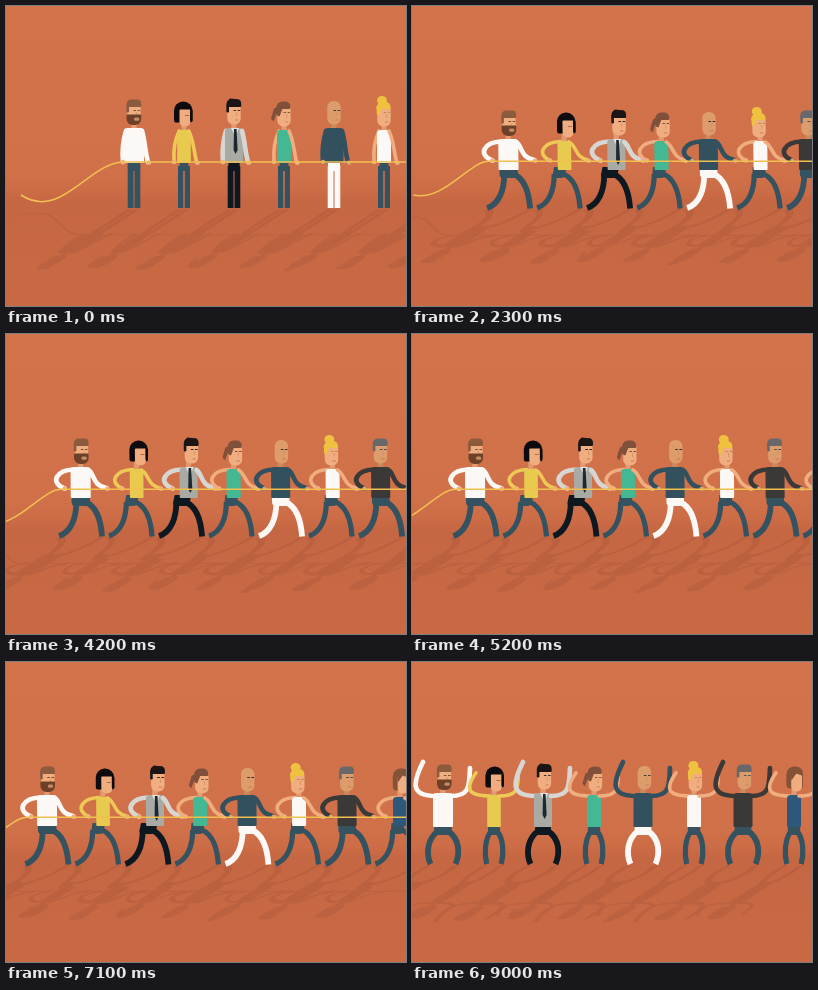
An HTML page with a canvas for the animation above (9100 ms loop, 400 px wide and 300 px high).

```html
<!DOCTYPE html>
<html lang="en">
<head>
<meta charset="utf-8">
<title>Tug of war</title>
<style>
html, body { margin: 0; width: 100%; height: 100%; overflow: hidden; background: #d3734b; }
canvas { display: block; width: 400px; height: 300px; }
</style>
</head>
<body>
<canvas id="stage"></canvas>
<script>
const W = 400, H = 300, LOOP = 9100, STEP = 100, GROUND = 203;
const SKIN = '#f0ae80', TAN = '#dc9c6c', SLATE = '#34525f', WHITE = '#fbf8f5', DARK = '#3b3937';

const ratio = window.devicePixelRatio || 1;
function surface(canvas) {
  canvas.width = W * ratio;
  canvas.height = H * ratio;
  const c = canvas.getContext('2d');
  c.scale(ratio, ratio);
  return c;
}
const view = surface(document.getElementById('stage'));
const shade = surface(document.createElement('canvas'));

let g = view, solid = null;
const ink = color => solid || color;

// Limbs are cubic curves: four x,y pairs measured from the figure's middle.
const STAND = {
  top: 122, bot: 157, hip: 0.63,
  la: [-8, 125, -11, 135, -12, 145, -11, 156],
  ra: [8, 125, 11, 135, 11, 146, 14, 156],
  ll: [-3.4, 160, -3.4, 174, -3.4, 188, -3.4, 202],
  rl: [3.4, 160, 3.4, 174, 3.4, 188, 3.4, 202]
};
const TUG = {
  top: 133, bot: 164, hip: 0.92,
  la: [-7, 135.5, -23, 136, -32, 148, -16, 154.5],
  ra: [8, 136, 14, 140, 12, 152, 26, 154],
  ll: [-4.5, 168, -4.5, 184, -10, 198, -22, 202],
  rl: [5, 168, 16, 173, 20, 186, 21, 202.5]
};
const CHEER = {
  top: 131, bot: 165, hip: 0.88,
  la: [-7, 134, -32, 134, -31, 122, -20, 100],
  ra: [8, 134, 28, 134, 26, 122, 27, 106],
  ll: [-5, 169, -16, 177, -17, 192, -12.5, 202],
  rl: [5, 169, 17, 177, 17, 192, 12.5, 202]
};

// dx: body shift while pulling, hx: extra head shift
const TEAM = [
  { hair: beard, top: WHITE, arm: WHITE, leg: SLATE, half: 10, dx: 0, hx: 1 },
  { hair: bob, top: '#e8cb4e', arm: '#eec955', leg: SLATE, half: 6.8, dx: 6, hx: 3, fem: 1 },
  { hair: quiff, top: '#a9aaa4', arm: '#d8d6d2', leg: '#0e1820', half: 9, dx: 8, hx: 3, tie: 1 },
  { hair: pony, top: '#43b892', arm: SKIN, leg: SLATE, half: 7, dx: 3, hx: 2, fem: 1 },
  { hair: bald, top: '#33505f', arm: '#33505f', leg: WHITE, half: 9.5, dx: 0, hx: 1, skin: TAN },
  { hair: bun, top: WHITE, arm: SKIN, leg: SLATE, half: 7, dx: 2, hx: -1, fem: 1 },
  { hair: grey, top: DARK, arm: DARK, leg: SLATE, half: 9.5, dx: 0, hx: 0, skin: TAN },
  { hair: long, top: '#2d587a', arm: SKIN, leg: SLATE, half: 7, dx: 3, hx: 2, fem: 1 }
];

const mix = (a, b, k) => a + (b - a) * k;
const ease = (t, from, to) => {
  const k = Math.min(1, Math.max(0, (t - from) / (to - from)));
  return k * k * (3 - 2 * k);
};

function blend(a, b, k) {
  const out = {};
  for (const key in a) {
    out[key] = Array.isArray(a[key]) ? a[key].map((v, i) => mix(v, b[key][i], k)) : mix(a[key], b[key], k);
  }
  return out;
}

function box(x, y, w, h, r, color) {
  g.fillStyle = ink(color);
  g.beginPath();
  g.roundRect(x, y, w, h, r);
  g.fill();
}

function dot(x, y, rx, ry, color) {
  g.fillStyle = ink(color);
  g.beginPath();
  g.ellipse(x, y, rx, ry, 0, 0, 7);
  g.fill();
}

function poly(color, ...p) {
  g.fillStyle = ink(color);
  g.beginPath();
  for (let i = 0; i < p.length; i += 2) g.lineTo(p[i], p[i + 1]);
  g.closePath();
  g.fill();
}

function limb(p, width, color) {
  g.strokeStyle = ink(color);
  g.lineWidth = width;
  g.beginPath();
  g.moveTo(p[0], p[1]);
  g.bezierCurveTo(p[2], p[3], p[4], p[5], p[6], p[7]);
  g.stroke();
}

// Heads: origin at the chin
function face(skin, brow) {
  box(-6.7, -23.5, 13.4, 23.5, 6, skin);
  box(-0.5, -14.5, 2.6, 0.9, 0, brow);
  box(3.6, -14.5, 2.6, 0.9, 0, brow);
  box(2.4, -12.5, 0.8, 4, 0, '#d18f64');
  box(1, -5, 3.4, 0.9, 0, '#c9795a');
}
function cap(color) {
  box(-7.6, -25, 14.8, 7.5, [5, 4, 1, 1], color);
  box(-7.6, -19, 2.6, 7, 1, color);
}
function beard(skin) {
  face(skin, '#7a4a33');
  cap('#8c5b3d');
  box(-7.4, -10, 14.6, 10.5, [1, 1, 6, 6], '#6d4028');
  box(0, -7, 5.4, 3.2, 1.5, '#c58a66');
}
function bob(skin) {
  box(-10, -25, 18.5, 21, [9, 9, 2, 2], '#0d0b0d');
  box(-4.5, -17, 11, 17, [1, 1, 5, 5], skin);
  box(6, -17, 2.5, 12, 1, '#0d0b0d');
  box(1, -11.5, 4, 0.8, 0, '#8d5a40');
}
function quiff(skin) {
  face(skin, '#2a2020');
  cap('#1b1516');
  poly('#1b1516', -7, -23, -4, -26, 5, -25, 7.2, -19, 1, -17.5);
}
function pony(skin) {
  poly('#80503a', -5, -20, -10, -18, -13, -8, -10.5, -5, -8, -12, -4, -14);
  face(skin, '#80503a');
  box(-7.6, -25, 14, 7.5, [6, 5, 1, 1], '#80503a');
  poly('#80503a', -7.5, -20, -1, -19, -4.5, -10, -7, -11);
}
function bald(skin) {
  face(skin, '#33302f');
}
function bun(skin) {
  dot(-2, -26, 5, 4.6, '#eec23f');
  face(skin, '#b98a4a');
  box(-7.6, -24.5, 14.2, 7, [6, 5, 1, 1], '#eec23f');
  poly('#eec23f', -7.6, -20, -2, -19, -5, -11, -7.2, -12);
}
function grey(skin) {
  face(skin, '#4b4b4b');
  cap('#68686a');
}
function long(skin) {
  box(-9, -25, 16.5, 22, [8, 7, 2, 4], '#835237');
  box(-4.2, -18, 10.8, 18, [1, 4, 5, 5], skin);
  poly('#835237', -5, -21, 7, -20, 6.5, -16, 1, -18, -4, -11);
}

function figure(f, x, s) {
  const { pose, pull, cheer, lean, bob: lift } = s;
  const legScale = f.fem ? 1 - 0.42 * cheer : 1;
  const inset = 10 - f.half;
  const arm = p => f.fem
    ? p.map((v, i) => i % 2 ? (v < 131 && cheer ? mix(v, 131 + (v - 131) * 0.65, cheer) : v)
      : (i === 0 ? v - Math.sign(v) * inset : v * 0.9))
    : p;
  const leg = p => p.map((v, i) => i % 2 ? v : v * legScale);
  const skin = f.skin || SKIN;
  const top = pose.top + (f.fem ? 2 : 0), bot = pose.bot;
  const hip = f.half * pose.hip, dx = f.dx * pull;
  const armW = f.fem ? 3.6 : 4.7, legW = f.fem ? 5.2 : 5.8;

  g.save();
  // scale from the ground for the jump, shear for the lean
  g.transform(1, 0, 0, 1 + lift, x, -GROUND * lift);
  const k = lean / 78;
  g.transform(1, 0, k, 1, -195 * k, 0);
  limb(leg(pose.ll), legW, f.leg);
  limb(leg(pose.rl), legW, f.leg);
  g.transform(1, 0, -dx / 36, 1, dx * bot / 36 + dx * 0.2, 0);
  g.translate(0, 0);
  box(-hip, bot - 3, hip * 2, 11, [0, 0, 4, 4], f.leg);
  g.restore();

  g.save();
  g.transform(1, 0, 0, 1 + lift, x + dx, -GROUND * lift);
  g.transform(1, 0, k, 1, -195 * k, 0);
  const la = arm(pose.la), ra = arm(pose.ra);
  g.lineCap = 'round';
  limb(la, armW, f.arm);
  g.lineCap = 'butt';
  box(-2.6, top - 9, 5.2, 12, 1, f.skin ? '#c98a5e' : '#e39a70');
  box(-f.half, top, f.half * 2, bot - top, [3.5, 3.5, 1, 1], f.top);
  if (f.tie) {
    poly('#e4e2de', -3, top, 5, top, 1.5, top + 9);
    poly('#1d2730', 0, top + 1, 2.6, top + 1, 3.6, top + 22, 1.6, top + 26, -0.4, top + 22);
  }
  g.lineCap = 'round';
  limb(ra, armW, f.arm);
  g.lineCap = 'butt';
  const hand = 2.2 * (1 - cheer);
  if (hand > 0.1) {
    dot(ra[6] + 0.8, ra[7] + 0.8, hand + 0.3, hand, skin);
    dot(la[6], la[7], hand, hand, skin);
  }
  g.translate(f.hx * pull + cheer * 1.4, top - 3.5);
  f.hair(skin);
  g.restore();
}

function rope(x, s) {
  const p = s.pull;
  const join = x - mix(11, 20, p) + s.lean * -0.8 * -1;
  const y = mix(156, 155.3, p);
  g.strokeStyle = ink('#f1c050');
  g.lineWidth = 1.5;
  g.beginPath();
  g.moveTo(W + 150, y);
  g.lineTo(join, y);
  g.bezierCurveTo(join - mix(35, 20, p), y + 1, join - mix(62, 45, p), mix(215, 196, p), join - mix(102, 75, p), 189);
  g.stroke();
}

function stateAt(t) {
  const pull = ease(t, 0.2, 1.2), cheer = ease(t, 7.9, 8.4);
  const rock = 4 * Math.sin(Math.PI * (t - 0.15)) ** 2 * ease(t, 2.2, 2.5);
  const lean = 11 * ease(t, 0.5, 1.4) - 10.5 * ease(t, 1.5, 2.4) + rock;
  return {
    x: t < 1.2 ? mix(128, 109.8, ease(t, 0.2, 1.2)) : Math.max(31, 109.8 - 11.6 * (t - 1.2)),
    pose: blend(blend(STAND, TUG, pull), CHEER, cheer),
    pull: pull * (1 - cheer),
    cheer,
    lean: lean * (1 - cheer),
    bob: 0.05 * cheer * Math.sin(Math.PI * (t - 9) / 0.6) ** 2,
    rope: t < 8.1
  };
}

function scene(s) {
  // shear pushes points above the ground to the left
  TEAM.forEach((f, i) => figure(f, s.x + i * 50 + (f.fem ? s.cheer : 0), s));
  if (s.rope) rope(s.x, { ...s, lean: -s.lean });
}

const wall = view.createLinearGradient(0, 0, 0, H);
[[0, '#d3734b'], [0.55, '#d1714a'], [0.61, '#cd6d47'], [0.65, '#c66743'], [1, '#c96a45']]
  .forEach(([at, color]) => wall.addColorStop(at, color));

function draw(ms) {
  const s = stateAt(ms / 1000);

  g = shade;
  solid = '#000';
  g.clearRect(0, 0, W, H);
  g.save();
  g.transform(1, 0, 0.85, -0.55, -0.85 * GROUND, GROUND * 1.55);
  scene(s);
  g.restore();

  g = view;
  solid = null;
  g.fillStyle = wall;
  g.fillRect(0, 0, W, H);
  g.globalAlpha = 0.055;
  g.drawImage(shade.canvas, 0, 0, W, H);
  g.globalAlpha = 1;
  scene(s);
}

const start = performance.now();
function tick() {
  const ms = (performance.now() - start) % LOOP;
  draw(Math.floor(ms / STEP) * STEP);
  requestAnimationFrame(tick);
}
tick();
</script>
</body>
</html>
```
